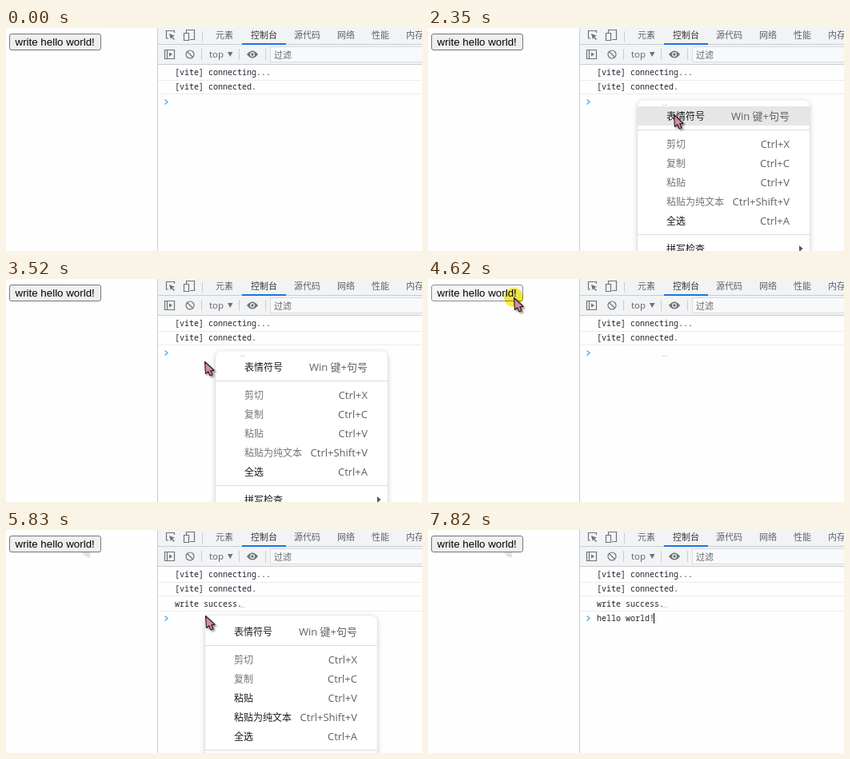
Write an HTML page that moves like this. It is 520 px wide and 279 px high and loops after 8350 ms.

```html
<!DOCTYPE html>
<html lang="zh-CN">
<head>
<meta charset="utf-8">
<style>
html, body { margin: 0; width: 100%; height: 100%; overflow: hidden; background: #fefefe; }
svg { display: block; width: 520px; height: 279px; }
text { white-space: pre; }
.ui { font: 11px "Noto Sans CJK SC", "Noto Sans CJK", sans-serif; fill: #5f6368; }
.mono { font: 10px "Noto Sans Mono", monospace; fill: #202430; }
.btn { font: 13.333px "Liberation Sans", sans-serif; fill: #000; }
.item { font: 12px "Noto Sans CJK SC", "Noto Sans CJK", sans-serif; fill: #1b1b1b; }
.item.off { fill: #737373; }
.keys { font: 13px "Open Sans", "Noto Sans CJK SC", "Noto Sans CJK", sans-serif; fill: #606060; text-anchor: end; }
.icon { fill: none; stroke: #6e7378; stroke-width: 1.2; }
.rule { stroke: #cacdd1; }
.row { stroke: #ececec; }
#panel { filter: drop-shadow(0 2px 3px #0003); }
#pointer { filter: drop-shadow(2px 2px 1px #0006); }
#halo { fill: #f8ee48; mix-blend-mode: multiply; }
</style>
</head>
<body>
<svg viewBox="0 0 520 279">
  <rect width="520" height="279" fill="#fefefe"/>

  <rect id="button" x="4.5" y="7.5" width="114" height="20" rx="2.5"/>
  <text class="btn" x="11.5" y="22">write hello world!</text>
  <path id="wedge" d="M95 28H105V34.5A12 12 0 0 1 95 28Z" fill="#e2e2e2"/>

  <rect x="190" width="330" height="45" fill="#f1f3f4"/>
  <path class="rule" d="M189.5 0V279M190 20.5H520M190 45.5H520M245.5 4V17M244.5 26V40M291.5 26V40M324.5 26V40"/>
  <rect x="295" y="19" width="55" height="2" fill="#1a73e8"/>
  <g class="icon">
    <path d="M203 13H200.500V3.500H210.500V6"/>
    <path d="M204 7L211 9.800 208 11 211 14 210 15 207 12 205.800 14Z" fill="#6e7378" stroke="none"/>
    <path d="M225.500 6V2.500H235.500V14.500H230M222.500 6.500H228.500V15.500H222.500Z"/>
    <path d="M198.500 27.500H210.500V38.500H198.500ZM201.500 27.500V38.500"/>
    <path d="M204 30.500L208 33 204 35.500Z" fill="#6e7378" stroke="none"/>
    <circle cx="230" cy="33" r="5"/><path d="M226.500 29.500L233.500 36.500"/>
    <path d="M301 33Q308 24 315 33Q308 42 301 33Z" fill="#6e7378" stroke="none"/>
    <circle cx="308" cy="33" r="2.400" fill="#6e7378" stroke="#f1f3f4"/>
  </g>
  <g id="tabs" class="ui"></g>
  <text x="254" y="37" style="font:11.500px 'Open Sans',sans-serif" fill="#5f6368">top</text>
  <path d="M277 30H283.500L280.200 36Z" fill="#6e7378"/>
  <rect x="330.5" y="23.500" width="200" height="19" fill="#f8f9fa" stroke="#d8dbde"/>
  <text class="ui" x="335" y="37.500">过滤</text>

  <path class="row" d="M190 65.500H520M190 82.500H520"/>
  <text class="mono" x="211" y="59">[vite] connecting...</text>
  <text class="mono" x="211" y="77">[vite] connected.</text>
  <g id="logged">
    <path class="row" d="M190 101.500H520"/>
    <text class="mono" x="211" y="96">write success.</text>
  </g>
  <path id="prompt" d="M198.500 89.500L202 92.500 198.500 95.500" fill="none" stroke="#5aa9e6" stroke-width="1.400"/>
  <text id="pasted" class="mono" x="211" y="114">hello world!</text>
  <rect id="caret" width="1" height="13" fill="#000"/>

  <g id="menu">
    <path id="panel" d="M0 200V8Q0 0 8 0H207Q215 0 215 8V200Z" fill="#fff" stroke="#e4e4e4" stroke-width=".5"/>
    <rect id="hover" width="215" height="24" fill="#e6e6e6"/>
    <path d="M0 37.500H215M0 168.500H215" stroke="#dcdcdc"/>
    <g id="items"></g>
    <path d="M202 182L206.500 186 202 190Z" fill="#555"/>
  </g>
  <rect id="dash" x="292" y="96" width="7" height="1" fill="#dcdcdc"/>

  <circle id="halo" r="12"/>
  <path id="pointer" d="M.500 .500L1.500 15.500 4.800 12.800 7 18 10 16.800 7.800 11.800 12 11.300Z"
        fill="#d98ca0" stroke="#2c2027" stroke-width="1.200" stroke-linejoin="round"/>
</svg>
<script>
const LOOP = 8350, STEP = 70;
const $ = id => document.getElementById(id);
const show = (id, on) => { $(id).style.display = on ? '' : 'none'; };
const move = (id, x, y) => $(id).setAttribute('transform', `translate(${x} ${y})`);
const within = (t, spans) => spans.find(([from, to]) => t >= from && t < to);

$('tabs').innerHTML = [['元素', 262], ['控制台', 306], ['源代码', 360], ['网络', 414], ['性能', 457], ['内存', 500]]
  .map(([name, x]) => `<text x="${x}" y="13"${x === 306 ? ' fill="#333" style="fill:#333"' : ''}>${name}</text>`).join('');

// label, shortcut, row centre, first menu in which it is enabled
const ITEMS = [
  ['表情符号', 'Win 键+句号', 20, 0],
  ['剪切', 'Ctrl+X', 55, 2],
  ['复制', 'Ctrl+C', 79, 2],
  ['粘贴', 'Ctrl+V', 103, 1],
  ['粘贴为纯文本', 'Ctrl+Shift+V', 127, 1],
  ['全选', 'Ctrl+A', 151, 0],
  ['拼写检查', '', 186, 0]
];
$('items').innerHTML = ITEMS.map(([label, keys, y]) =>
  `<text class="item" x="36" y="${y + 5}">${label}</text><text class="keys" x="190" y="${y + 5}">${keys}</text>`).join('');
const labels = [...document.querySelectorAll('.item')];

// from, to, left, top
const MENUS = [[2020, 3660, 262, 90], [5700, 6510, 249, 107]];
const CLICKS = [[1090, 1420], [1950, 2090], [3590, 3730], [4550, 4760], [5500, 5640], [6440, 6510]];
// from, to, left, top
const CARETS = [
  [1090, 1950, 211, 86], [2750, 3280, 211, 86], [3660, 4060, 211, 86],
  [5500, 5700, 211, 104], [6510, 6580, 211, 104], [6580, 7180, 282, 104], [7820, LOOP, 282, 104]
];
// time, x, y of the pointer tip
const PATH = [
  [320, 319, 256], [740, 296, 150], [1090, 262, 90], [2020, 262, 90], [2350, 307, 108], [2480, 307, 108],
  [2550, 312, 128], [2680, 312, 128], [3030, 326, 190], [3380, 268, 140], [3520, 248, 103], [3590, 246, 95],
  [3990, 246, 95], [4550, 107, 23], [4950, 107, 23], [5230, 242, 125], [5360, 242, 125], [5500, 249, 107],
  [5960, 249, 107], [6240, 301, 204], [6440, 303, 204], [6580, 303, 204], [7210, 286, 106],
  [7340, 286, 106], [7550, 374, 221], [7620, 374, 221]
];

function pointerAt(t) {
  const i = PATH.findIndex(([time]) => time > t);
  if (i < 1) return null;
  const [t0, x0, y0] = PATH[i - 1], [t1, x1, y1] = PATH[i];
  const k = Math.floor((t - t0) / STEP) * STEP / (t1 - t0);
  return [x0 + (x1 - x0) * k, y0 + (y1 - y0) * k];
}

function drawMenu(t, pointer) {
  const menu = within(t, MENUS);
  show('menu', menu);
  if (!menu) return;
  const [, , left, top] = menu, index = MENUS.indexOf(menu);
  const [px, py] = [pointer[0] - left, pointer[1] - top];
  move('menu', left, top);
  ITEMS.forEach(([, , , since], i) => labels[i].classList.toggle('off', index < since));
  const hit = ITEMS.find(([, , y, since]) => index >= since && px > 0 && Math.abs(py - y) < 12);
  show('hover', hit);
  if (hit) $('hover').setAttribute('y', hit[2] - 12);
}

function draw(t) {
  const pointer = pointerAt(t), click = within(t, CLICKS), caret = within(t, CARETS);
  show('pointer', pointer);
  show('halo', pointer && click);
  if (pointer) {
    move('pointer', ...pointer);
    move('halo', ...pointer);
  }
  if (click) $('halo').style.opacity = Math.min(1, 2 * (click[1] - t) / (click[1] - click[0]));

  const over = pointer && pointer[0] < 119 && pointer[1] < 28;
  const [fill, stroke] = !over ? ['#efefef', '#767676'] : click ? ['#f5f5f5', '#8d8d8d'] : ['#e5e5e5', '#4f4f4f'];
  $('button').setAttribute('fill', fill);
  $('button').setAttribute('stroke', stroke);

  show('caret', caret);
  if (caret) move('caret', caret[2], caret[3]);
  const logged = t >= 4690;
  show('logged', logged);
  move('prompt', 0, logged ? 18 : 0);
  show('pasted', t >= 6580);
  show('dash', t >= 1150);
  show('wedge', t >= 5020);
  drawMenu(t, pointer);
}

const start = performance.now();
function tick() {
  draw((performance.now() - start) % LOOP);
  requestAnimationFrame(tick);
}
tick();
</script>
</body>
</html>
```
